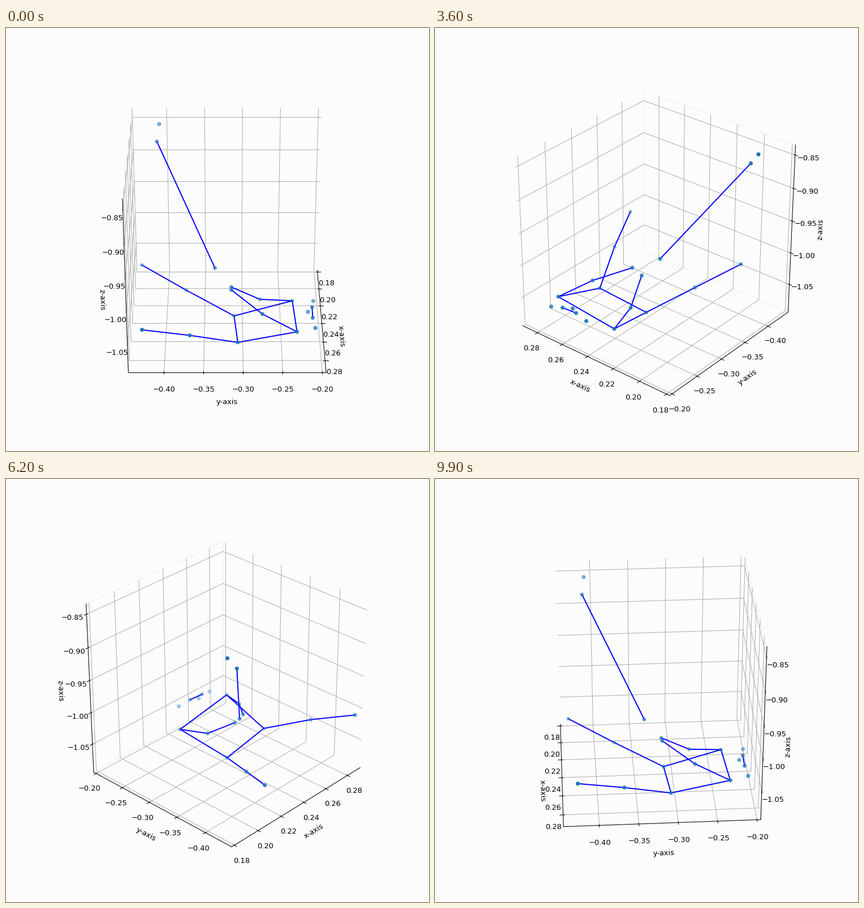
Write a matplotlib script that moves like this. It is 748x748 px and loops after 10000 ms.

```python
import numpy as np
import matplotlib.pyplot as plt
from matplotlib.animation import FuncAnimation

FRAMES = 100
BACKGROUND = "#fcfcfc"

JOINTS = {
    "tip": (0.19190, -0.40886, -0.84446),
    "top": (0.19811, -0.41176, -0.86372),
    "base": (0.23795, -0.33614, -1.00915),
    "a1": (0.21086, -0.43442, -1.04120),
    "a2": (0.22500, -0.37463, -1.06251),
    "a3": (0.23932, -0.31111, -1.08391),
    "b1": (0.29617, -0.42578, -1.02268),
    "b2": (0.28651, -0.36727, -1.04558),
    "b3": (0.27471, -0.30666, -1.07424),
    "r0": (0.23444, -0.23441, -1.06643),
    "r1": (0.23840, -0.27725, -1.05845),
    "r2": (0.24421, -0.31487, -1.03070),
    "l0": (0.27755, -0.23162, -1.05331),
    "l1": (0.26763, -0.27512, -1.03998),
    "l2": (0.25154, -0.31491, -1.02480),
    "f1": (0.24558, -0.20814, -1.05094),
    "f2": (0.25453, -0.21057, -1.04782),
    "f3": (0.26534, -0.21064, -1.04914),
    "f4": (0.25956, -0.21628, -1.04799),
    "f5": (0.27333, -0.20789, -1.05344),
}

CHAINS = [
    "top base",
    "a1 a2 a3 b3 b2 b1",
    "a3 r0 l0 b3",
    "r0 r1 r2",
    "l0 l1 l2",
    "f2 f3",
]

fig = plt.figure(figsize=(8, 8), dpi=93.5, facecolor=BACKGROUND)
ax = fig.add_subplot(projection="3d", facecolor=BACKGROUND)
ax.set_box_aspect((1, 1, 1))

ax.scatter(*np.array(list(JOINTS.values())).T)
for chain in CHAINS:
    ax.plot(*np.array([JOINTS[name] for name in chain.split()]).T, color="blue")

ax.set(xlabel="x-axis", ylabel="y-axis", zlabel="z-axis")
ax.set_xlim(0.17776, 0.29211)
ax.set_ylim(-0.44515, -0.19525)
ax.set_zlim(-1.09512, -0.83502)

# Only the y pane keeps a faint outline
for axis, edge in ((ax.xaxis, "none"), (ax.yaxis, (0.9, 0.9, 0.9, 0.5)), (ax.zaxis, "none")):
    axis.pane.set_alpha(None)
    axis.pane.fill = False
    axis.pane.set_edgecolor(edge)


def update(i):
    ax.view_init(elev=30, azim=i * 360 / FRAMES)
    return ()


anim = FuncAnimation(fig, update, frames=FRAMES, interval=100,
                     init_func=lambda: (), repeat=True, repeat_delay=0)
plt.show()
```
